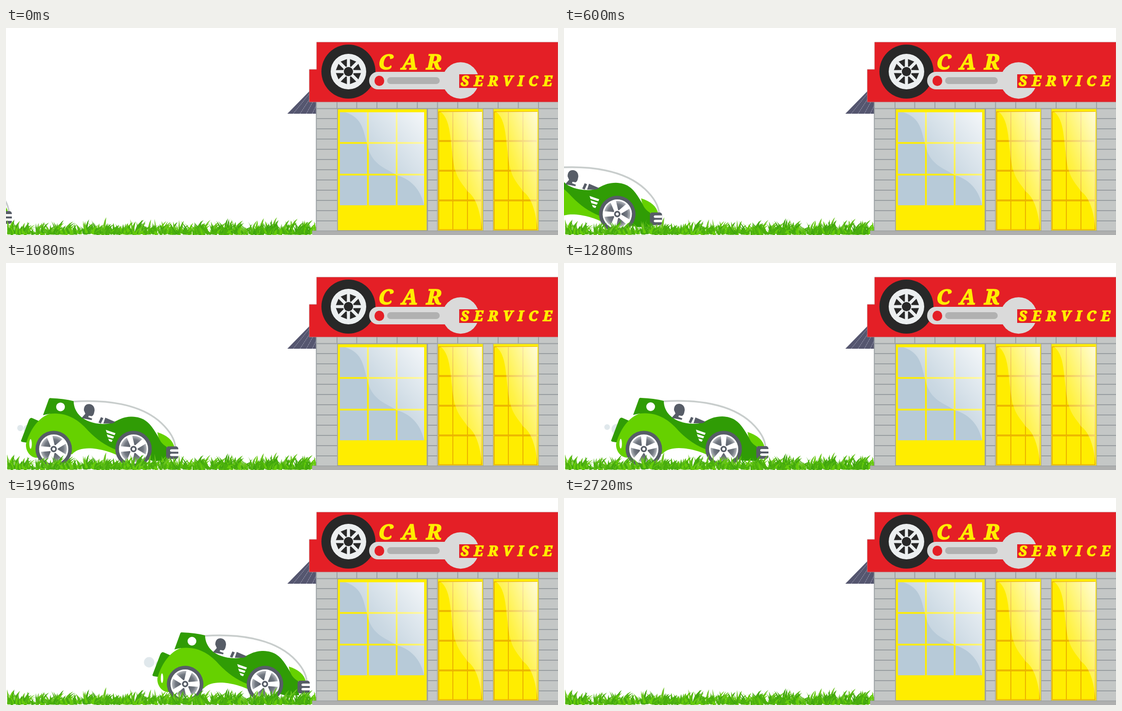
Recreate the animation shown at these times as an HTML page. Size 1134 by 425 pixels, loop 2760 ms.

```html
<!DOCTYPE html>
<html lang="en">
<head>
<meta charset="utf-8">
<title>Car service</title>
<style>
  html, body { margin: 0; width: 100%; height: 100%; overflow: hidden; background: #fff; }
  svg { display: block; width: 100%; height: 100%; }
  .sign { font: italic 900 44px "Noto Serif", "Liberation Serif", serif; fill: #ffed00; stroke: #ffed00; stroke-width: 1.6; }
  .dark { fill: #309c05; }
  .lime { fill: #66d100; }
  .slate { fill: #575d67; }
</style>
</head>
<body>
<svg viewBox="0 0 1134 425">
  <defs>
    <linearGradient id="shine" x1="0" y1="1" x2="1" y2="0">
      <stop offset=".2" stop-color="#fff" stop-opacity=".05"/>
      <stop offset=".5" stop-color="#fff" stop-opacity=".28"/>
      <stop offset="1" stop-color="#fff" stop-opacity=".85"/>
    </linearGradient>
    <radialGradient id="rim">
      <stop offset=".3" stop-color="#5a606a"/>
      <stop offset=".7" stop-color="#747a83"/>
      <stop offset="1" stop-color="#c4c7cb"/>
    </radialGradient>
    <path id="gloss" d="M11 0C49 12 48 42 56 65C64 109 96 115 116 129C152 139 167 165 173 191V0Z" fill="url(#shine)"/>
    <g id="wheel">
      <circle r="37.5" class="slate"/>
      <circle r="28.5" fill="url(#rim)" stroke="#fff" stroke-width="3"/>
      <g id="spokes" fill="#fff"></g>
      <circle r="8.5" fill="#fff"/>
      <circle r="6.5" class="slate"/>
      <circle r="3" fill="#fff"/>
    </g>
    <g id="door">
      <path d="M887 166H980V416H887Z" fill="#ffed00" stroke="#b9b58a"/>
      <path id="panels" fill="none" stroke="#e8a800" stroke-width="1.7"/>
      <use href="#gloss" transform="translate(887 172) scale(.526 1.267)"/>
    </g>
  </defs>

  <g id="car">
    <g id="puffs" fill="#e0e8ec"></g>
    <g id="body">
      <path class="dark" d="M217 364L233 322Q236 316 240 318L256 325L233 369L220 367Q216 366 217 364Z"/>
      <path class="lime" d="M227 372C229 360 247 311 285 307C330 305 350 340 385 360L414 372V394C392 383 341 370 322 392L252 399C240 402 226 388 227 372Z"/>
      <path class="dark" d="M262 312L274 279Q275 276 279 277Q305 278 325 283C325 307 345 329 385 330C412 331 416 315 445 315C490 316 491 358 516 376L518 406H488L412 383C390 374 371 361 354 343C332 318 303 301 262 312Z"/>
      <path class="lime" d="M497 347C517 353 529 364 532 378H518C506 372 499 362 497 347Z"/>
      <path d="M325 284C390 280 462 288 505 328C525 347 533 364 534 378" fill="none" stroke="#c8cdcc" stroke-width="3.4"/>
      <path class="slate" d="M346 302C346 293 350 289 357 289C364 290 368 294 368 302C367 308 366 313 362 314L356 313L355 316L363 319L362 322L341 318L349 309ZM381 316L386 318L381 329L376 327ZM390 317L411 326L404 329L386 329Z"/>
      <circle cx="298" cy="295" r="9" fill="#fff"/>
      <path d="M391 342L411 349L409 353L393 348ZM393 351L408 356L406 360L395 357ZM396 360L405 363L403 367L398 365Z" fill="#fff"/>
      <ellipse cx="236.500" cy="371" rx="2.500" ry="10" fill="#fff"/>
      <rect class="slate" x="515" y="376" width="25" height="26" rx="5"/>
      <path d="M540 382H526Q523 382 523 384.500T526 387H540ZM540 391H526Q523 391 523 393.500T526 396H540Z" fill="#fff"/>
    </g>
    <g transform="translate(284 382)"><use href="#wheel" class="roll"/></g>
    <g transform="translate(448 382)"><use href="#wheel" class="roll"/></g>
  </g>

  <g id="grass"></g>

  <path d="M578 176L623 130H638V176Z" fill="#55566f"/>
  <path d="M590 176L623 135M604 176L629 138M617 176L634 145M629 176L638 158" fill="none" stroke="#a2a3b8" stroke-dasharray="3 1"/>

  <path d="M637 152H1134V417H637Z" fill="#c4c7c6"/>
  <path id="bricks" fill="none" stroke="#999ea1" stroke-width="1.800"/>
  <path d="M681 166H865V416H681Z" fill="#ffed00" stroke="#999ea1" stroke-width="1.500"/>
  <path d="M686 173H859V364H686Z" fill="#b7cad8"/>
  <path d="M743.500 172V364M802.500 172V364M685 236H860M685 301H860" stroke="#ffed00" stroke-width="3.500"/>
  <use href="#gloss" x="686" y="173"/>
  <use href="#door"/>
  <use href="#door" x="114"/>
  <path d="M629 416H1134V425H629Z" fill="#aeafaf"/>
  <path d="M629 416.500H1134" stroke="#96999b"/>

  <path d="M638 29H1134V152H623V85H638Z" fill="#e41f26" stroke="#b98a8a" stroke-width=".7"/>
  <g transform="translate(703.5 89.5)">
    <circle r="55.500" fill="#282828"/>
    <circle r="36.500" fill="#eceff0"/>
    <g id="holes" fill="#282828"></g>
    <circle r="9.500" fill="#282828"/>
  </g>
  <rect x="746" y="90" width="175" height="36" rx="18" fill="#dadada"/>
  <circle cx="934" cy="107.700" r="37.500" fill="#dadada"/>
  <path d="M931 95H973V123H931Z" fill="#e41f26"/>
  <ellipse cx="767" cy="108.500" rx="10" ry="10.500" fill="#e41f26"/>
  <rect x="783" y="101" width="108" height="14" rx="7" fill="#b1b1b1"/>
  <text class="sign" x="765" y="84.500" letter-spacing="18">CAR</text>
  <text class="sign" x="934" y="118.500" style="font-size:29px" letter-spacing="10.500">SERVICE</text>
</svg>
<script>
const $ = id => document.getElementById(id);
const range = (n, fn) => Array.from({ length: n }, (_, i) => fn(i)).join("");

$("spokes").innerHTML = range(5, i => `<path d="M-4-5L-6-29H6L4-5Z" transform="rotate(${i * 72})"/>`);
$("holes").innerHTML = range(8, i => `<path d="M-7-25H7L1-11H-1Z" transform="rotate(${i * 45 + 22.5})"/>`);
$("panels").setAttribute("d", range(4, i => `M889 ${172 + i * 61}h88v59h-88ZM918 ${172 + i * 61}v59m30 0v-59`));
$("bricks").setAttribute("d", "M637.500 152V416M680 152V166M637 165.500H1134M866 166V416M886.500 166V416M980 166V416M1001 166V416M1094 166V416" +
  range(10, i => `M${720.5 + i * 41.5} 152v13`) +
  range(11, i => [[638, 42], [866, 21], [980, 21], [1094, 40]].map(([x, w]) => `M${x} ${186 + i * 21}h${w}`).join("")));

// Seeded grass in layers, tall at the back
let seed = 7;
const rnd = () => (seed = seed * 16807 % 2147483647) / 2147483647;
function blade(tall) {
  const x = 5 + rnd() * 630, h = 7 + rnd() * tall, y = 425 - rnd() * 4;
  const lean = (rnd() - .5) * 34, w = 1.6 + rnd() * 1.4;
  const tip = Math.max(2, Math.min(637, x + lean));
  const p = v => v.toFixed(1);
  return `M${p(x - w)} ${p(y)}Q${p(x - w)} ${p(y - h * .65)} ${p(tip)} ${p(y - h)}Q${p(x + w)} ${p(y - h * .5)} ${p(x + w)} ${p(y)}Z`;
}
const greens = ["#6cc520", "#3fa50d", "#57b914", "#45aa0e", "#66cc0a", "#4bb00c"];
$("grass").innerHTML = range(12, i => `<path fill="${greens[i % 6]}" d="${range(60, () => blade(26 - i * 1.4))}"/>`);

const STEP = 40, STEPS = 69;
const front = [[0, 12], [8, 108], [14, 189], [21, 276], [28, 367], [32, 420], [56, 708], [60, 770], [64, 858], [68, 974]];
const bounce = [[0, 0], [8, 3.5], [14, 3], [21, 1], [32, 0], [37, -3], [42, 0], [49, -1], [56, 3.5], [68, 0]];

function at(keys, n) {
  const i = Math.max(1, keys.findIndex(k => k[0] >= n));
  const [a, u] = keys[i - 1], [b, v] = keys[i];
  return u + (v - u) * (n - a) / (b - a);
}

// Alternating small and big puffs drift back from the exhaust
function puff(i, n) {
  const k = n - 14 - 18 * i;
  if (k < -8 || k > 28) return "";
  const r = (11.5 - .013 * (k - 9) ** 2) * (i % 2 ? 1 : .56);
  return `<circle cx="${228 - .7 * k - .021 * k * k}" cy="${341 - .013 * k * k}" r="${r}"/>`;
}

const wheels = document.querySelectorAll(".roll");
function draw() {
  const n = Math.floor(performance.now() / STEP) % STEPS;
  $("car").setAttribute("visibility", n === STEPS - 1 ? "hidden" : "visible");
  $("car").setAttribute("transform", `translate(${at(front, n) - 540})`);
  $("body").setAttribute("transform", `translate(0 ${at(bounce, n)})`);
  wheels.forEach(w => w.setAttribute("transform", `rotate(${(n - 32) * 18})`));
  $("puffs").innerHTML = range(5, i => puff(i, n));
  requestAnimationFrame(draw);
}
draw();
</script>
</body>
</html>
```
